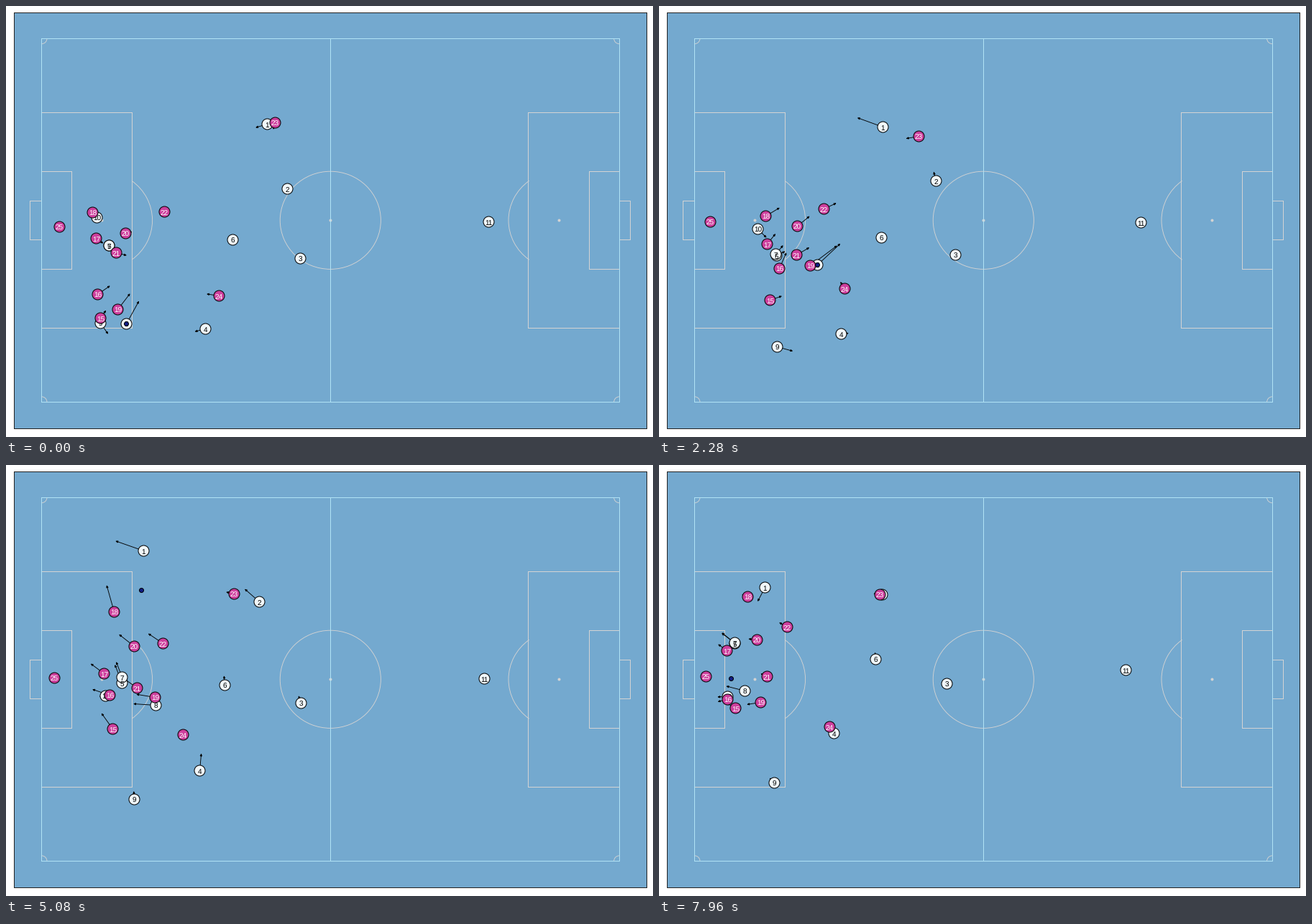
These frames come from a looping animation (900x600 px, 8 s). A matplotlib script:

```python
import numpy as np
import matplotlib
matplotlib.rcParams["toolbar"] = "None"
matplotlib.rcParams["text.hinting"] = "none"
import matplotlib.pyplot as plt
from matplotlib.animation import FuncAnimation
from matplotlib.collections import LineCollection
from matplotlib.patches import Arc, Rectangle

W, H, DPI = 900, 600, 100
STEP, FRAMES = 40, 200
PX = 72 / DPI
GRASS, EDGE, LIGHT, GREY = "#74a9cf", "#222222", "#b0e2f5", "#d3d3d3"
WHITE, PINK, NAVY = "#f0f7fa", "#cd3f9d", "#101c84"

fig = plt.figure(figsize=(W / DPI, H / DPI), dpi=DPI, facecolor="white")
ax = fig.add_axes([0, 0, 1, 1])
ax.set_xlim(0, W)
ax.set_ylim(H, 0)
ax.axis("off")

# ---- pitch, measured in metres from its centre ----
CX, CY = 451.3, 298.3
SX, SY = 804 / 105, 506 / 68
LENGTH, WIDTH = 52.5, 34


def box(x0, y0, x1, y1, color, fill="none"):
    # whole numbers: straight edges snap to the pixel they start in
    x0, y0, x1, y1 = np.floor([x0, y0, x1, y1])
    ax.add_patch(Rectangle((x0, y0), x1 - x0, y1 - y0, fc=fill, ec=color,
                           lw=PX, aa=False, zorder=1))


def field(x0, x1, half, color=GREY):
    x0, x1 = sorted((x0, x1))
    box(CX + x0 * SX, CY - half * SY, CX + x1 * SX, CY + half * SY, color)


def arc(x, y, r, a=0, b=360):
    ax.add_patch(Arc((CX + x * SX, CY + y * SY), 2 * r * SX, 2 * r * SY,
                     theta1=a, theta2=b, color=GREY, lw=.9 * PX, zorder=1))


def spot(x):
    ax.plot(np.floor(CX + x * SX), np.floor(CY), "o", color=GREY, ms=4 * PX,
            mew=0, zorder=1)


box(11, 9, 891, 588, EDGE, GRASS)
arc(0, 0, 9.15)
spot(0)
for side in (-1, 1):
    goal = side * LENGTH
    for depth, half in [(16.5, 20.16), (5.5, 9.16), (-2, 3.66)]:
        field(goal, goal - side * depth, half)
    spot(goal - side * 11)
    turn = 0 if side < 0 else 180
    arc(goal - side * 11, 0, 9.15, turn - 53, turn + 53)
    for end in (-1, 1):
        a = {(-1, -1): 0, (1, -1): 90, (1, 1): 180, (-1, 1): 270}[side, end]
        arc(goal, end * WIDTH, 1, a, a + 90)
field(-LENGTH, LENGTH, WIDTH, LIGHT)
field(0, 0, WIDTH, LIGHT)

# ---- players run smoothly through a few key points ----
# moments of the key points, by how many a run has
BEATS = {3: (0, 3.4, 7.96), 4: (0, 1.6, 3.4, 7.96),
         5: (0, 1.6, 3.4, 5.6, 7.96)}


class Run:
    """Monotone cubic path; a coordinate that turns back has no speed there."""

    def __init__(self, *points):
        self.p = np.array(points, float)
        self.t = np.array(BEATS[len(points)])
        mean = np.diff(self.p, axis=0) / np.diff(self.t)[:, None]
        a, b = mean[:-1], mean[1:]
        same = a * b > 0
        inner = np.where(same, 2 * a * b / np.where(same, a + b, 1), 0)
        self.v = np.vstack([.8 * mean[:1], inner, .8 * mean[-1:]])

    def at(self, t):
        """Position and velocity."""
        k = np.clip(np.searchsorted(self.t, t, side="right") - 1,
                    0, len(self.t) - 2)
        h = self.t[k + 1] - self.t[k]
        s = (t - self.t[k]) / h
        p, d = self.p[k], self.p[k + 1] - self.p[k]
        m, n = self.v[k] * h, self.v[k + 1] * h
        a, b = m + n - 2 * d, 3 * d - 2 * m - n
        return p + s * (m + s * (b + s * a)), (m + s * (2 * b + 3 * s * a)) / h


whites = {
    1: Run((363, 164), (332, 173), (269, 151), (176, 115), (147, 170)),
    2: Run((391, 254), (387, 249), (380, 227), (343, 184), (310, 180)),
    3: Run((409, 351), (413, 343), (400, 304)),
    4: Run((277, 449), (249, 456), (263, 454), (270, 414), (243, 373)),
    5: Run((143, 333), (156, 349), (171, 338), (156, 291), (105, 248)),
    6: Run((315, 325), (306, 320), (301, 270)),
    7: Run((143, 333), (156, 349), (169, 328), (157, 285), (105, 247)),
    8: Run((167, 442), (201, 380), (243, 338), (193, 333), (119, 314)),
    9: Run((131, 441), (151, 470), (179, 478), (178, 460), (160, 442)),
    10: Run((126, 294), (131, 303), (146, 319), (134, 321), (95, 322)),
    11: Run((671, 300), (670, 301), (649, 285)),
}
pinks = {
    15: Run((131, 434), (145, 414), (166, 402), (141, 358), (106, 338)),
    16: Run((127, 401), (160, 378), (173, 343), (133, 318), (95, 326)),
    17: Run((125, 323), (143, 336), (158, 313), (128, 283), (94, 258)),
    18: Run((120, 287), (137, 296), (162, 274), (145, 192), (123, 183)),
    19: Run((155, 422), (188, 379), (237, 337), (195, 322), (141, 330)),
    20: Run((166, 316), (182, 312), (204, 288), (169, 247), (136, 243)),
    21: Run((153, 343), (180, 350), (203, 333), (174, 305), (150, 294)),
    22: Run((220, 286), (222, 285), (243, 271), (209, 242), (178, 225)),
    23: Run((374, 162), (369, 179), (341, 183), (313, 178), (307, 180)),
    24: Run((296, 403), (263, 398), (253, 384), (237, 364)),
    25: Run((74, 307), (69, 298), (65, 294)),
}

# ---- ball: 8 dribbles and passes, 1 dribbles and crosses ----
PASS, CATCH, CROSS, END = 2.8, 5.85, 6.6, 7.96
MOUTH = np.array([100, 297])


def ball_at(t):
    def spot_of(num, when):
        return whites[num].at(when)[0]

    if t < PASS:
        return spot_of(8, t)
    if t < CATCH:
        a, b, s = spot_of(8, PASS), spot_of(1, CATCH), (t - PASS) / (CATCH - PASS)
    elif t < CROSS:
        return spot_of(1, t)
    else:
        a, b, s = spot_of(1, CROSS), MOUTH, (t - CROSS) / (END - CROSS)
    return a + (b - a) * s


# ---- moving artists ----
arrows = LineCollection([], colors="black", linewidths=.9 * PX, zorder=2)
ax.add_collection(arrows)


def dots(size, color, z):
    return ax.plot([], [], "o", ms=size * PX, mfc=color, mec="black", mew=PX,
                   zorder=z)[0]


def label(num, color, z):
    return ax.text(0, 0, str(num), family="Liberation Sans", size=10 * PX,
                   color=color, ha="center", va="baseline", zorder=z)


teams = [(runs, dots(15, fill, z), {n: label(n, ink, z + 1) for n in runs})
         for runs, fill, ink, z in [(whites, WHITE, "black", 3),
                                    (pinks, PINK, "white", 5)]]
ball = dots(6, NAVY, 7)


def arrow(p, v):
    """One second of travel, with a small head."""
    p = p + .5
    tip = p + v
    d = v / np.hypot(*v)
    side = np.array([-d[1], d[0]]) * 1.2
    back = tip - 2.5 * d
    return [p, tip, back + side, back - side, tip]


def draw(i):
    t = i * STEP / 1000
    shafts = []
    for runs, marks, labels in teams:
        spots = []
        for n, run in runs.items():
            p, v = run.at(t)
            p = np.rint(p)
            spots.append(p)
            labels[n].set_position((p[0] + .5, p[1] + 4.6))
            if np.hypot(*v) > 4:
                shafts.append(arrow(p, v))
        marks.set_data(*np.transpose(spots))
    arrows.set_segments(shafts)
    x, y = np.rint(ball_at(t))
    ball.set_data([x], [y])
    return [arrows, ball]


anim = FuncAnimation(fig, draw, frames=FRAMES, interval=STEP, repeat=True,
                     repeat_delay=0, init_func=lambda: draw(0))
plt.show()
```
